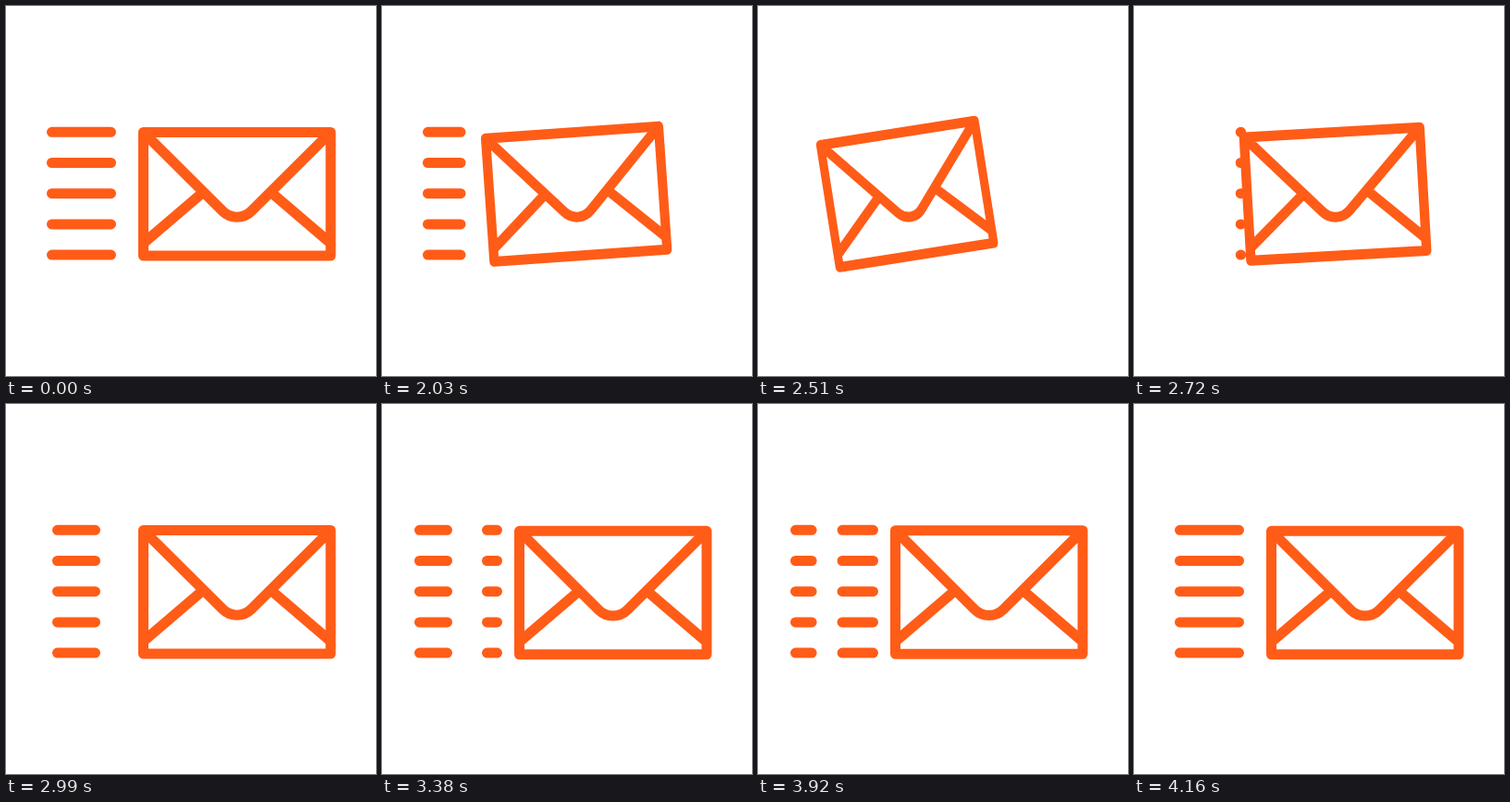
Write an HTML page with a canvas that moves like this. It is 400 by 400 pixels and loops after 4.22 s.

```html
<!DOCTYPE html>
<html lang="en">
<head>
<meta charset="utf-8">
<title>Flying envelope</title>
<style>
html, body { margin: 0; width: 100%; height: 100%; overflow: hidden; background: #fff; }
canvas { display: block; width: 400px; height: 400px; }
</style>
</head>
<body>
<canvas id="stage" width="400" height="400"></canvas>
<script>
const ctx = document.getElementById('stage').getContext('2d');
const LOOP = 4220, HOLD = 2030, STEP = 30, LAST = 4160;
const LEFT = 148.5, RIGHT = 351, TOP = 136.5, BOTTOM = 270;
const CX = (LEFT + RIGHT) / 2, CY = (TOP + BOTTOM) / 2;
const TRACK_X = 40.5, TRACK = 84;
const REST_START = 9, REST_LEN = 64, FLOW_LEN = 41;

// time, dash start on the track, speed
const FLOW = [
  [2510, 93, 0],
  [2990, 15, -0.26],
  [3380, -95, -0.24],
  [3710, -161, -0.19],
  [4160, -243, -0.15]
];

const ramp = (t, a, b) => Math.min(1, Math.max(0, (t - a) / (b - a)));
const inOut = u => u < 0.5 ? 2 * u * u : 1 - 2 * (1 - u) * (1 - u);

// How far the envelope is pulled back: 0 at rest, 1 fully
function pull(t) {
  if (t < HOLD) return 0;
  if (t < 2490) return 1 - 0.555 * (1 - ramp(t, HOLD, 2450)) ** 2;
  return 1 - inOut(ramp(t, 2490, 2890));
}

function flowStart(t) {
  let i = 0;
  while (i < FLOW.length - 2 && t > FLOW[i + 1][0]) i++;
  const [t0, x0, v0] = FLOW[i], [t1, x1, v1] = FLOW[i + 1];
  const d = t1 - t0, u = ramp(t, t0, t1), w = 1 - u;
  return x0 * (1 + 2 * u) * w * w + v0 * d * u * w * w
       + x1 * u * u * (3 - 2 * u) - v1 * d * u * u * w;
}

function dash(a, b) {
  for (let i = 0; i < 5; i++) {
    const y = 136.3 + 33.2 * i;
    ctx.moveTo(TRACK_X + a, y);
    ctx.lineTo(TRACK_X + b, y);
  }
}

function drawDashes(t) {
  let start = REST_START, len = REST_LEN * (1 - pull(t));
  if (t >= 2490) {
    start = flowStart(t);
    start -= Math.floor(start / TRACK) * TRACK;
    len = FLOW_LEN * inOut(ramp(t, 2700, 2960))
        + (REST_LEN - FLOW_LEN) * inOut(ramp(t, 3710, LAST));
  }
  if (len < 0.01) return;
  const end = start + len;
  ctx.beginPath();
  dash(start, Math.min(end, TRACK));
  if (end > TRACK) dash(0, end - TRACK);
  ctx.stroke();
}

function drawEnvelope(t) {
  const p = pull(t);
  const bob = t < 2990 ? 0 : 0.8 * Math.sin(Math.PI * (t - 2990) / 780) ** 2;
  ctx.save();
  ctx.translate(CX - 89 * p, CY + bob);
  ctx.rotate(-9 * p * Math.PI / 180);
  ctx.scale(1 - 0.168 * p, 1);
  ctx.translate(-CX, -CY);
  ctx.beginPath();
  ctx.rect(LEFT, TOP, RIGHT - LEFT, BOTTOM - TOP);
  ctx.moveTo(LEFT + 1, TOP + 1);
  ctx.arcTo(CX, 237.2, RIGHT - 1, TOP + 1, 22);
  ctx.lineTo(RIGHT - 1, TOP + 1);
  for (const side of [-1, 1]) {
    ctx.moveTo(CX + 38 * side, 202.5);
    ctx.lineTo(CX + 100 * side, 255.5);
  }
  ctx.stroke();
  ctx.restore();
}

function draw(now) {
  let t = now % LOOP;
  t = t < HOLD ? 0 : Math.min(LAST, HOLD + Math.floor((t - HOLD) / STEP) * STEP);
  ctx.fillStyle = '#fff';
  ctx.fillRect(0, 0, 400, 400);
  ctx.strokeStyle = '#ff5c18';
  ctx.lineWidth = 11;
  ctx.lineCap = ctx.lineJoin = 'round';
  drawDashes(t);
  drawEnvelope(t);
}

const begin = performance.now();
function tick() {
  draw(performance.now() - begin);
  requestAnimationFrame(tick);
}
tick();
</script>
</body>
</html>
```
